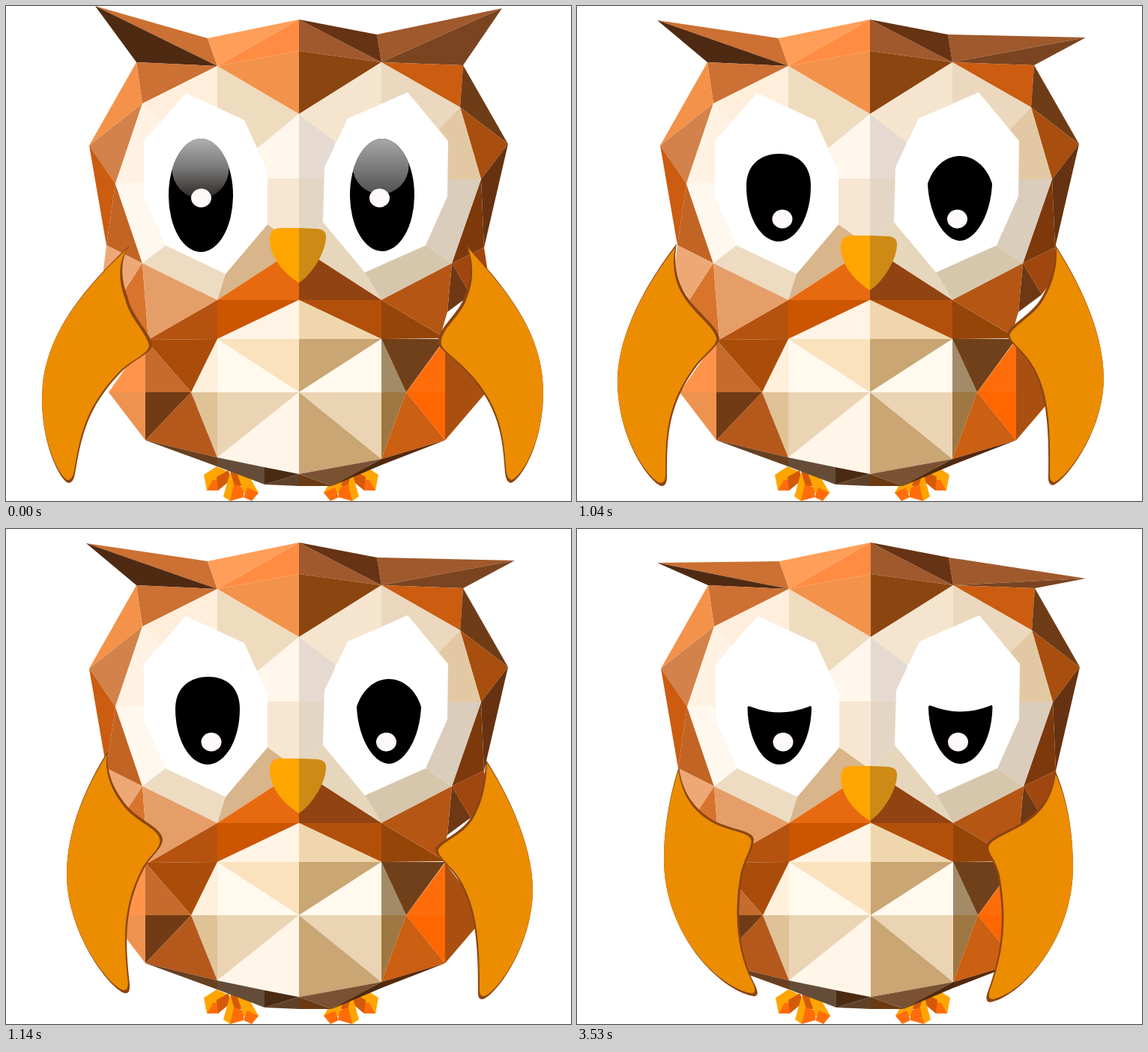
An HTML page that plays this animation: 754 by 660 pixels, repeating every 5.01 s.

```html
<!DOCTYPE html>
<html lang="en">
<head>
<meta charset="utf-8">
<title>Blinking owl</title>
<style>
  html, body { margin: 0; width: 100%; height: 100%; overflow: hidden; background: #fff; }
  svg { display: block; }
  .wing { fill: #8b4513; }
  .wing.inner { fill: #ec8c00; transform-box: fill-box; transform: scale(.972); }
  .left.inner { transform-origin: 1.5% 54%; }
  .right.inner { transform-origin: 98.5% 54%; }
</style>
</head>
<body>
<svg width="754" height="660" viewBox="0 0 754 660">
  <defs>
    <linearGradient id="gloss" x2="0" y2="1">
      <stop stop-color="#b0b0b0"/><stop offset=".5" stop-color="#777"/><stop offset="1" stop-color="#2b2622"/>
    </linearGradient>
    <linearGradient id="glossRight" x2="0" y2="1">
      <stop stop-color="#aaa"/><stop offset="1" stop-color="#505050"/>
    </linearGradient>
    <clipPath id="pupils"><ellipse cx="260" cy="252.5" rx="43" ry="75.5"/><ellipse cx="502" cy="252" rx="43" ry="75"/></clipPath>
    <g id="foot">
      <path fill="#ffa500" d="M264 625L281 614 297 621 285 630 268 646Z"/>
      <path fill="#ff6d0a" d="M268 646L276 632 290 631 283 646Z"/>
      <path fill="#d45a08" d="M281 628L297 619 300 632 283 646Z"/>
      <path fill="#ffa500" d="M290 654L299 622 308 636 306 657 299 660Z"/>
      <path fill="#d45a08" d="M299 620L314 624 322 640 305 640Z"/>
      <path fill="#ff6d0a" d="M299 660L304 638 318 642 317 655Z"/>
      <path fill="#ffa500" d="M308 622L326 630 337 649 328 659 317 648Z"/>
      <path fill="#ff6d0a" d="M317 655L322 642 337 649 328 660Z"/>
    </g>
  </defs>

  <g id="body">
    <use href="#foot"/>
    <use href="#foot" transform="translate(761) scale(-1 1)"/>

    <!-- ears -->
    <g data-on="0 1040">
      <path fill="#cc7033" d="M119 0L269 43 282 80Z"/><path fill="#4f2a12" d="M119 0L282 80 174 75Z"/>
      <path fill="#a0592c" d="M662 3L495 38 501 75Z"/><path fill="#7a4420" d="M662 3L501 75 610 79Z"/>
    </g>
    <g data-on="1040 1210">
      <path fill="#cc7033" d="M107 19L269 43 282 80Z"/><path fill="#4f2a12" d="M107 19L282 80 174 75Z"/>
      <path fill="#a0592c" d="M679 42L495 38 501 75Z"/><path fill="#7a4420" d="M679 42L501 75 610 79Z"/>
    </g>
    <g data-on="1210 5010">
      <path fill="#cc7033" d="M106 45L269 43 282 80Z"/><path fill="#4f2a12" d="M106 45L282 80 174 75Z"/>
      <path fill="#a0592c" d="M678 66L495 38 501 75Z"/><path fill="#7a4420" d="M678 66L501 75 610 79Z"/>
    </g>

    <!-- head -->
    <path fill="#ff9e58" d="M269 43L391 18 282 80Z"/>
    <path fill="#ff8c42" d="M391 18V60L282 80Z"/>
    <path fill="#f3924a" d="M282 80L391 60V144Z"/>
    <path fill="#a0592c" d="M391 18V60L501 75Z"/>
    <path fill="#663314" d="M391 18L495 38 501 75Z"/>
    <path fill="#8b4510" d="M391 60L501 75 391 144Z"/>
    <path fill="#cc7033" d="M174 75L282 80 182 130Z"/>
    <path fill="#f4924a" d="M174 75L182 130 111 186Z"/>
    <path fill="#d2824a" d="M111 186L182 130 146 237Z"/>
    <path fill="#cb5c10" d="M111 186L146 237 134 319Z"/>
    <path fill="#c26424" d="M146 237L182 343 134 319Z"/>
    <path fill="#eda876" d="M134 319L182 343 150 392 129 360Z"/>
    <path fill="#d8742c" d="M182 343L150 392 190 445Z"/>
    <path fill="#cb5c10" d="M501 75L610 79 606 135Z"/>
    <path fill="#6e3c17" d="M610 79L670 184 606 135Z"/>
    <path fill="#a84e0e" d="M606 135L670 184 634 231Z"/>
    <path fill="#663211" d="M634 231L670 184 638 322Z"/>
    <path fill="#7d390b" d="M634 231L638 322 595 343Z"/>
    <path fill="#a0470f" d="M595 343L638 322 643 355 620 385Z"/>
    <path fill="#6e3814" d="M595 343L620 385 589 408Z"/>

    <!-- face -->
    <path fill="#ffeedc" d="M182 130L282 80V140H240L208 155Z"/>
    <path fill="#fff2e2" d="M182 130L208 155 190 180V236L146 237Z"/>
    <path fill="#fff8ee" d="M146 237L190 236 213 319 182 343Z"/>
    <path fill="#eddcc2" d="M182 343L213 319 293 357 282 392Z"/>
    <path fill="#d8b58a" d="M282 392L293 357 349 291 391 321Z"/>
    <path fill="#efdbbd" d="M282 80L391 144 335 190 282 140Z"/>
    <path fill="#fff6ec" d="M391 144V230H345L335 190Z"/>
    <path fill="#f7e6d2" d="M345 230H391V321L349 291Z"/>
    <path fill="#f5e5ce" d="M391 144L501 75V135L440 181Z"/>
    <path fill="#e6dad0" d="M391 144L440 181 430 230H391Z"/>
    <path fill="#e3d6c4" d="M391 230H430L423 288 391 321Z"/>
    <path fill="#e6d6bc" d="M423 288L479 355 501 392 391 321Z"/>
    <path fill="#ebd8be" d="M501 75L606 135 577 165 501 135Z"/>
    <path fill="#e3c9a3" d="M606 135L634 231H585L577 165Z"/>
    <path fill="#dacdbc" d="M634 231L595 343 560 319 585 231Z"/>
    <path fill="#d6c7ac" d="M595 343L501 392 479 355 560 319Z"/>
    <path fill="#fff" d="M240 116L318 152 349 220V291L293 357 213 319 184 254V180Z"/>
    <path fill="#fff" d="M536 115L590 180 589 254 560 319 479 355 423 288 425 215 456 150Z"/>

    <!-- chest -->
    <path fill="#e69e69" d="M182 343L282 392 190 445Z"/>
    <path fill="#b5520f" d="M190 445L282 392V444Z"/>
    <path fill="#e86a10" d="M282 392L391 321V392Z"/>
    <path fill="#cc5500" d="M282 392H391L282 444Z"/>
    <path fill="#914311" d="M391 321L501 392H391Z"/>
    <path fill="#b2500b" d="M391 392H501V444Z"/>
    <path fill="#964508" d="M501 392L580 439 584 443 501 444Z"/>
    <path fill="#b55614" d="M501 392L595 343 589 408 580 439Z"/>
    <path fill="#fff4e6" d="M282 444L391 392V444Z"/>
    <path fill="#f0d6ac" d="M391 392L501 444H391Z"/>

    <!-- belly -->
    <path fill="#fae2bd" d="M282 444H391V515Z"/>
    <path fill="#fff9ee" d="M282 444L391 515H282Z"/>
    <path fill="#c9a673" d="M391 444H501L391 515Z"/>
    <path fill="#fff9ee" d="M501 444V515H391Z"/>
    <path fill="#ebd4b4" d="M282 515H391L282 602Z"/>
    <path fill="#fff5e9" d="M391 515V624L282 602Z"/>
    <path fill="#ebd4b4" d="M391 515H501V604Z"/>
    <path fill="#c9a673" d="M391 515L501 604 391 624Z"/>
    <path fill="#fff0dc" d="M282 444V515H247Z"/>
    <path fill="#e0c297" d="M247 515H282V602Z"/>
    <path fill="#a28b66" d="M501 444L534 515H501Z"/>
    <path fill="#9f7742" d="M501 515H534L501 604Z"/>

    <!-- flanks -->
    <path fill="#ab4d0a" d="M186 445L282 444 247 515Z"/>
    <path fill="#c56b2d" d="M186 445L247 515H186Z"/>
    <path fill="#713b15" d="M186 515H247L186 579Z"/>
    <path fill="#b5581c" d="M247 515L282 602 186 579Z"/>
    <path fill="#ff944a" d="M186 445V515H137Z"/>
    <path fill="#ee9250" d="M137 515H186V579Z"/>
    <path fill="#70401a" d="M501 444H586L534 515Z"/>
    <path fill="#ff6d0a" d="M586 445V515H534Z"/>
    <path fill="#ff6600" d="M534 515H586V579Z"/>
    <path fill="#cb5f12" d="M534 515L586 579 501 604Z"/>
    <path fill="#a95010" d="M586 445L640 516 586 579Z"/>

    <!-- underside -->
    <path fill="#67401f" d="M186 579L282 602V614Z"/>
    <path fill="#654c38" d="M282 602L345 615V638L282 614Z"/>
    <path fill="#4a2a12" d="M345 615L391 624 345 638Z"/>
    <path fill="#5f4028" d="M345 638L391 624V640Z"/>
    <path fill="#6b3a12" d="M391 624L435 640H391Z"/>
    <path fill="#7a5233" d="M391 624L501 604 435 640Z"/>
    <path fill="#4b2a12" d="M435 640L501 604V612Z"/>
    <path fill="#55290d" d="M501 604L586 579 501 612Z"/>
  </g>

  <!-- eyes -->
  <g data-on="0 1040">
    <ellipse cx="260" cy="252.5" rx="43" ry="75.5"/><ellipse cx="502" cy="252" rx="43" ry="75"/>
    <g clip-path="url(#pupils)">
      <ellipse cx="259.5" cy="216.5" rx="38" ry="40" fill="url(#gloss)"/>
      <ellipse cx="500" cy="213" rx="37.5" ry="38" fill="url(#glossRight)"/>
    </g>
    <g fill="#fffafa"><ellipse cx="260.5" cy="256" rx="13.5" ry="12.5"/><ellipse cx="498.5" cy="256" rx="13.5" ry="12.5"/></g>
  </g>
  <g data-on="1040 1210">
    <path d="M226 240C226 210 247 197 270 197S312 210 312 240C312 282 292 314 269 314S226 282 226 240Z"/>
    <path d="M468 237C476 212 494 200 511 200S546 212 554 237C552 282 530 313 511 313S470 282 468 237Z"/>
    <g fill="#fffafa"><ellipse cx="274" cy="284" rx="13.5" ry="12.5"/><ellipse cx="507.5" cy="284" rx="13.5" ry="12.5"/></g>
  </g>
  <g data-on="1210 5010">
    <path id="lidded" d="M227.500 238Q228 235 232 237 270 252 309 237 313 234 313 239C312 283 292 314 270 314S228 280 227.500 238Z"/>
    <use href="#lidded" x="241.500" y="-1"/>
    <g fill="#fffafa"><ellipse cx="275" cy="284" rx="13.5" ry="12.5"/><ellipse cx="508.500" cy="284" rx="13.5" ry="12.5"/></g>
  </g>

  <g id="beak">
    <path fill="#ffa500" d="M391 296H365Q352 297 352 311C352 335 371 357 391 369Z"/>
    <path fill="#cd8a14" d="M391 296L415 297Q428 298 427 309C426 330 408 358 391 369Z"/>
  </g>

  <!-- wings -->
  <g data-on="0 970">
    <path class="wing left" d="M165 319C150 340 155 370 162 387C168 415 193 435 195 452C193 465 170 470 150 492C105 540 100 580 92 624Q90 635 84 636C75 636 48 590 48 524C48 440 105 375 165 319Z"/>
    <path class="wing right" d="M614 318C625 350 617 375 612 387C605 410 575 430 577 449C577 458 600 470 621 495C660 540 663 580 666 622Q667 634 673 636C683 636 717 590 717 514C717 430 660 370 614 318Z"/>
  </g>
  <g data-on="970 1140">
    <path class="wing left" d="M133 317C128 345 133 370 150 392C165 412 188 428 190 443C188 455 170 465 157 484C120 535 120 580 120 627Q120 640 113 640C100 638 54 580 54 500C55 430 100 360 133 317Z"/>
    <path class="wing right" d="M638 318C640 345 632 370 618 392C605 412 578 425 574 437C574 447 590 455 603 475C627 510 630 560 629 625Q628 639 635 639C650 635 703 570 703 495C702 430 668 365 638 318Z"/>
  </g>
  <g data-on="1140 1310">
    <path class="wing left" d="M136 296C132 330 150 355 162 370C180 390 208 398 209 414C208 428 193 435 183 455C155 510 160 560 165 607Q166 620 159 619C140 615 81 540 81 460C81 400 108 340 136 296Z"/>
    <path class="wing right" d="M640 307C640 335 633 365 620 385C605 408 577 415 573 427C574 437 590 447 602 465C627 505 630 555 630 615Q629 628 636 627C650 625 703 560 703 480C703 420 668 350 640 307Z"/>
  </g>
  <g data-on="1310 5010">
    <path class="wing left" d="M136 317C140 350 155 370 175 384C200 402 235 400 236 414C235 428 225 440 221 460C212 510 215 565 237 607Q245 623 236 623C190 615 116 540 116 440C116 395 125 350 136 317Z"/>
    <path class="wing right" d="M638 322C635 350 622 372 600 387C580 402 548 410 546 423C546 432 556 440 561 460C572 520 567 565 549 615Q543 630 551 631C590 625 662 550 662 450C662 400 653 355 638 322Z"/>
  </g>
</svg>
<script>
  const LOOP = 5010;
  const body = document.getElementById('body');
  const beak = document.getElementById('beak');

  // Each wing is a brown shape with a slightly smaller orange copy on top.
  for (const wing of document.querySelectorAll('.wing')) {
    const inner = wing.cloneNode();
    inner.classList.add('inner');
    wing.after(inner);
  }

  const poses = [...document.querySelectorAll('[data-on]')].map(el => {
    const [from, to] = el.dataset.on.split(' ').map(Number);
    return { el, from, to };
  });

  function draw(now) {
    const t = now % LOOP;
    for (const { el, from, to } of poses) el.style.display = t >= from && t < to ? '' : 'none';
    body.setAttribute('transform', `translate(${t < 1210 ? 0 : 1})`);
    beak.setAttribute('transform', `translate(0 ${t < 970 ? 0 : t < 1210 ? 10 : 20})`);
  }

  const start = performance.now();
  function tick() {
    draw(performance.now() - start);
    requestAnimationFrame(tick);
  }
  tick();
</script>
</body>
</html>
```
